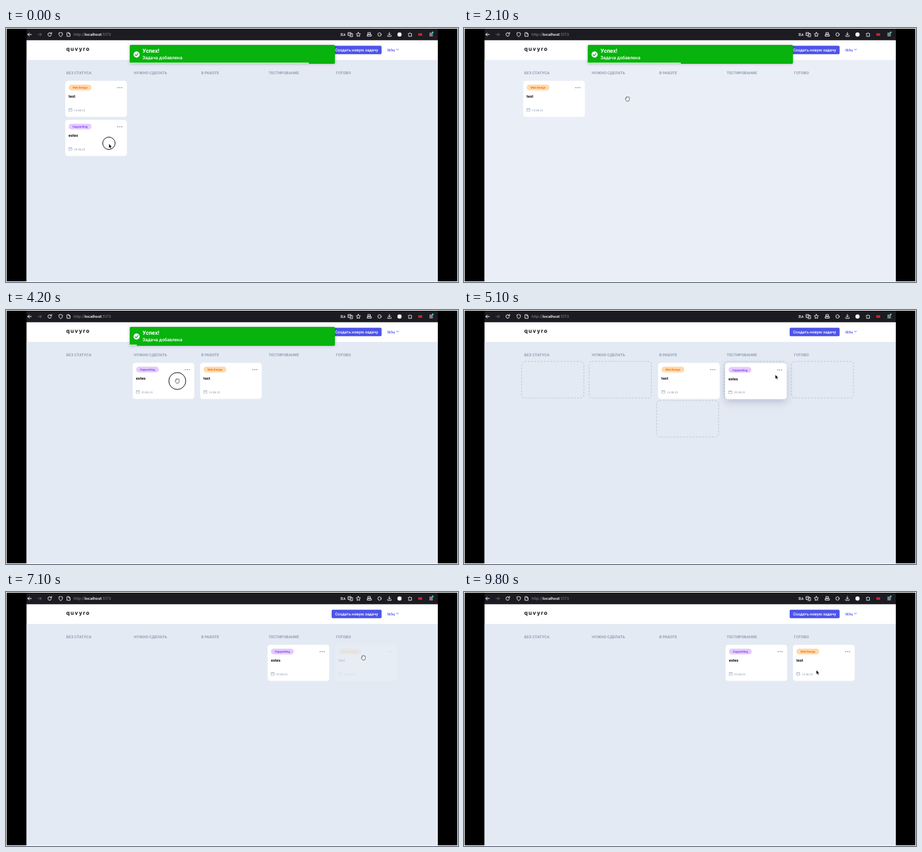
Animation, 694 px wide and 390 px high, one loop 9.9 s. Source, as an HTML page:

```html
<!DOCTYPE html>
<html lang="ru">
<head>
<meta charset="utf-8">
<title>Task board</title>
<style>
html, body { margin: 0; width: 100%; height: 100%; overflow: hidden; background: #fff; }
svg { display: block; width: 694px; height: 390px; font-family: Roboto, Arial, sans-serif; text-rendering: geometricPrecision; }
.ui { font-family: Inter, Arial, sans-serif; }
.line { fill: none; stroke: #f4f4f6; stroke-width: 1; stroke-linecap: round; stroke-linejoin: round; }
.slot { fill: none; stroke: #bcc3d2; stroke-width: .9; stroke-dasharray: 3 2; }
.lifted { filter: drop-shadow(0 5px 6px rgba(75, 80, 130, .25)); }
#toast { filter: drop-shadow(0 .5px 2px rgba(0, 0, 0, .25)); }
</style>
</head>
<body>
<svg viewBox="0 0 694 390" xmlns="http://www.w3.org/2000/svg">
  <defs>
    <clipPath id="pageClip"><rect x="31.5" y="18.5" width="631.5" height="370.5"/></clipPath>
  </defs>
  <rect x="1" y="1" width="692" height="388"/>
  <rect x="31.5" y="18.5" width="631.5" height="370.5" fill="#fff"/>

  <g id="page" clip-path="url(#pageClip)">
    <rect x="31.5" y="49" width="631.5" height="340" fill="#e4eaf3"/>
    <rect id="haze" x="31.5" y="49" width="631.5" height="340" fill="#fff"/>
    <text class="ui" x="92.5" y="35.2" font-size="8.4" font-weight="700" letter-spacing="1.3" fill="#15151c">quvyro</text>
    <rect x="500" y="27.3" width="76.7" height="13" rx="1.7" fill="#4d54e8"/>
    <text x="538.3" y="36" font-size="6.2" font-weight="500" text-anchor="middle" fill="#fff">Создать новую задачу</text>
    <text x="585.5" y="36" font-size="6" font-weight="500" fill="#565eef">tkhu</text>
    <path d="M599.4 32.3l1.7 1.7 1.7-1.7" class="line" style="stroke:#565eef;stroke-width:.8"/>
    <g id="titles" font-size="6" font-weight="700" fill="#94a2b8"></g>
    <g id="slots"></g>
    <g id="cards"></g>
    <g id="toast">
      <rect x="190" y="26" width="315" height="29" rx="1.7" fill="#07b30c"/>
      <rect id="progress" x="190" y="53" height="2" fill="#fff" opacity=".7"/>
      <circle cx="200.5" cy="40.7" r="4.7" fill="#fff"/>
      <path d="M198.2 40.8l1.7 1.8 3-3.5" class="line" style="stroke:#07b30c;stroke-width:1.2"/>
      <text x="209.5" y="37.7" font-size="8.6" font-weight="700" fill="#fff">Успех!</text>
      <text x="209.5" y="47.6" font-size="7" font-weight="500" fill="#fff">Задача добавлена</text>
    </g>
  </g>

  <rect x="31.5" y="1" width="631.5" height="17.5" fill="#1c1b22"/>
  <rect id="hover" x="60" y="3" width="14" height="14" rx="2" fill="#45444e"/>
  <path class="line" d="M39 10h-5.5m2.3-2.3L33.500 10l2.300 2.300"/>
  <path class="line" style="stroke:#66656d" d="M49 10h5.500m-2.300-2.300L54.500 10l-2.300 2.300"/>
  <path id="reload" class="line" d="M69.400 8.500a2.700 2.700 0 1 0 .3 2.200M70 6.800v2h-2"/>
  <path id="spinner" class="line" d="M65.600 12.600a3.400 3.400 0 0 1 1.200-5.600"/>
  <path class="line" style="stroke-width:.9" d="M84 7l2.800 1c0 2.700-.8 4.300-2.800 5.300-2-1-2.800-2.600-2.800-5.300z"/>
  <path class="line" style="stroke-width:.9" d="M94 7.200h2.700l1.700 1.700v3.900H94zM96.500 7.200v1.900h1.900"/>
  <text class="ui" x="103.800" y="12.200" font-size="5.900" fill="#8f8e96">http://<tspan fill="#fff" font-weight="600">localhost</tspan>:5173</text>
  <text id="lang" x="513" y="12.300" font-size="5" font-weight="700" fill="#f4f4f6" style="font-family:Roboto,'Noto Sans CJK SC',sans-serif">文A</text>
  <g class="line" style="stroke-width:.9">
    <path d="M525.500 7h4v4.500h-4zM526.700 9h1.700M530.500 8.500h1.600v4.700H528"/>
    <path d="M541 6.700l1 2.100 2.300.3-1.700 1.600.4 2.300-2-1.100-2 1.100.4-2.300-1.700-1.600 2.300-.3z"/>
    <path d="M556 7h3.500v2.600H556zM555 12.500h6v-2.300h-6z"/>
    <circle cx="573.500" cy="10" r="2.600"/>
    <path d="M588.700 6.800v4m-1.800-1.700l1.800 1.800 1.800-1.800M586 11.500v1.300h5.400v-1.300"/>
    <path d="M618 8.500h1.300a1 1 0 0 1 2 0h1.400v4.300H618v-1.300a1 1 0 0 0 0-1.800z"/>
    <path d="M650.500 8h4.500m-4.500 2h4.500m-4.500 2h4.500"/>
  </g>
  <circle cx="604.200" cy="10" r="3.200" fill="#fff"/>
  <rect x="633" y="8" width="6" height="4" fill="#c4232d"/>
  <circle cx="655.200" cy="6.800" r="1.300" fill="#43d6b4"/>

  <g id="status">
    <rect x="31.5" y="381" width="104.500" height="8" fill="#24232b"/>
    <text class="ui" x="33.300" y="387" font-size="5" font-weight="600" fill="#fff">localhost</text>
  </g>

  <circle id="ring" fill="none" stroke="#15151c" stroke-width="1"/>
  <g id="pointer">
    <path id="arrow" d="M0 0v6.300l1.500-1.300 1 2.300 1.200-.5-1-2.300h2z" fill="#000" stroke="#fff" stroke-width=".4"/>
    <path id="hand" d="M-3.200-.5c.1-.9 1-.9 1.500-.1L-2-2.700c.2-.8 1-.8 1.200 0 .1-1 1.200-1 1.300 0 .2-.8 1.200-.7 1.300.2.400-.6 1.200-.4 1.200.4 0 2-.2 4-1.200 5.400h-3.200C-2.200 2.300-3 1-3.200-.5z" fill="#fff" stroke="#333" stroke-width=".7"/>
  </g>
</svg>
<script>
const LOOP = 9900, STEP = 100;
const COL = 103.55, ROW = 60;
const $ = id => document.getElementById(id);

// time, x, y, hand cursor until the next entry
const PATH = [
  [0, 158, 178, 0], [200, 160, 178, 0], [900, 200, 168, 0], [1600, 243, 118, 0],
  [2100, 251, 109, 1], [2300, 235, 108, 0], [2600, 152, 106, 1], [2900, 152, 106, 0],
  [3600, 358, 108, 0], [3700, 359, 106, 1], [4000, 263, 109, 1], [4200, 263, 109, 1],
  [4400, 271.6, 99, 0], [5000, 478, 100, 0], [5200, 478, 99, 1], [5300, 470, 100, 0],
  [5650, 360, 105, 1], [5900, 361, 106, 0], [6450, 460, 126, 0], [7000, 555, 102, 0],
  [7050, 555, 102, 1], [7250, 530, 98, 0], [7800, 72, 15, 0], [8000, 70, 14, 0],
  [8700, 70, 14, 0], [9000, 235, 190, 0], [9250, 420, 297, 0], [9600, 533, 122, 0],
  [9800, 541, 120, 0], [LOOP, 541, 120, 0]
];
const PRESSES = [-100, 2700, 4000, 5700, 7900];

const cards = [
  { title: 'test', tag: 'Web Design', date: '14.08.23', ink: '#ff6d00', paint: '#ffd9ac', row: 0,
    drags: [{ from: 2900, to: 3700, col: 2 }, { from: 5900, to: 7050, col: 4 }] },
  { title: 'estes', tag: 'Copywriting', date: '29.08.23', ink: '#8b3df0', paint: '#e2ccfd', row: 1,
    drags: [{ from: 200, to: 2100, col: 1 }, { from: 4400, to: 5200, col: 3 }] }
];

const clamp = v => Math.max(0, Math.min(1, v));
const ramp = (t, a, b) => clamp((t - a) / (b - a));
const show = (id, on) => $(id).setAttribute('visibility', on ? 'visible' : 'hidden');
const move = (el, x, y) => el.setAttribute('transform', `translate(${x} ${y})`);

function add(parent, tag, attrs, text) {
  const el = document.createElementNS('http://www.w3.org/2000/svg', tag);
  for (const k in attrs) el.setAttribute(k, attrs[k]);
  if (text) el.textContent = text;
  return parent.appendChild(el);
}

['БЕЗ СТАТУСА', 'НУЖНО СДЕЛАТЬ', 'В РАБОТЕ', 'ТЕСТИРОВАНИЕ', 'ГОТОВО'].forEach((name, i) =>
  add($('titles'), 'text', { x: 92.6 + COL * i, y: 71.2 }, name));

const slots = [0, 1, 2, 3, 4].map(() =>
  add($('slots'), 'rect', { class: 'slot', width: 95.5, height: 56, rx: 4.5 }));

for (const c of cards) {
  const g = c.el = add($('cards'), 'g', {});
  add(g, 'rect', { width: 94.6, height: 55.5, rx: 4.3, fill: '#fff' });
  add(g, 'rect', { x: 5.2, y: 6, width: 35, height: 8.8, rx: 4.4, fill: c.paint });
  add(g, 'text', { x: 22.7, y: 12, 'font-size': 4.3, 'font-weight': 700, 'text-anchor': 'middle', fill: c.ink }, c.tag);
  for (let i = 0; i < 3; i++) add(g, 'circle', { cx: 80.800 + 3 * i, cy: 10.5, r: .85, fill: '#74829c' });
  add(g, 'text', { x: 5, y: 26, 'font-size': 6, 'font-weight': 700, fill: '#15151c' }, c.title);
  add(g, 'path', { d: 'M5.500 42.800h4.800v4.200H5.500zM5.500 44h4.800M6.700 42v1M9.100 42v1', fill: 'none', stroke: '#94a6be', 'stroke-width': .6 });
  add(g, 'text', { x: 13.2, y: 46.500, 'font-size': 4.4, fill: '#8d9bb3' }, c.date);
}

function pointerAt(t) {
  let i = 0;
  while (i < PATH.length - 2 && PATH[i + 1][0] <= t) i++;
  const [t0, x0, y0, hand] = PATH[i], [t1, x1, y1] = PATH[i + 1];
  const p = ramp(t, t0, t1);
  return { x: x0 + (x1 - x0) * p, y: y0 + (y1 - y0) * p, hand };
}

function cardAt(c, t) {
  const drag = c.drags.find(d => t >= d.from && t < d.to);
  const last = c.drags.filter(d => t >= d.to).pop();
  const col = last ? last.col : 0;
  let x = 91 + COL * col, y = 81 + (last ? 0 : c.row * ROW);
  if (drag) {
    const grab = pointerAt(drag.from), now = pointerAt(t);
    x += now.x - grab.x;
    y += now.y - grab.y;
  }
  return { x, y, col, drag, alpha: last && !drag ? ramp(t, last.to, last.to + 350) : 1 };
}

function drawBoard(t) {
  const filled = [0, 0, 0, 0, 0];
  let dragging = false;
  for (const c of cards) {
    const s = cardAt(c, t);
    move(c.el, s.x, s.y);
    c.el.setAttribute('opacity', s.alpha);
    c.el.setAttribute('class', s.drag ? 'lifted' : '');
    if (s.drag) {
      dragging = true;
      $('cards').appendChild(c.el);
    } else filled[s.col]++;
  }
  show('slots', dragging);
  slots.forEach((el, i) => move(el, 88.500 + COL * i, 79 + ROW * filled[i]));
}

function drawToast(t) {
  const p = ramp(t, 4400, 5100);
  const y = p < .2 ? -20 * p : p < .4 ? -4 + 65 * (p - .2) : p < .45 ? 9 : 9 - 1580 * (p - .45);
  move($('toast'), 0, y);
  $('toast').setAttribute('opacity', 1 - ramp(p, .45, 1));
  $('progress').setAttribute('width', Math.max(0, 275 - t * .0629));
}

function draw(t) {
  const loading = t >= 8100 && t < 8300;
  show('status', loading);
  show('spinner', loading);
  show('reload', !loading);
  show('lang', !loading);
  show('hover', t >= 7800 && t < 8800);
  $('page').style.display = loading ? 'none' : '';
  $('haze').setAttribute('opacity', .2 * ramp(t, 1100, 2000) * (1 - ramp(t, 2200, 3600)));
  drawBoard(t);
  drawToast(t);

  const p = pointerAt(t);
  move($('pointer'), p.x, p.y);
  show('arrow', !p.hand);
  show('hand', p.hand);
  const press = PRESSES.find(s => t >= s && t <= s + 200);
  show('ring', press !== undefined);
  if (press !== undefined) {
    $('ring').setAttribute('r', 6 + (t - press) * .035);
    move($('ring'), p.x, p.y - (p.hand ? 0 : 1));
  }
}

const start = performance.now();
function tick() {
  const t = (performance.now() - start) % LOOP;
  draw(Math.floor(t / STEP) * STEP);
  requestAnimationFrame(tick);
}
tick();
</script>
</body>
</html>
```
